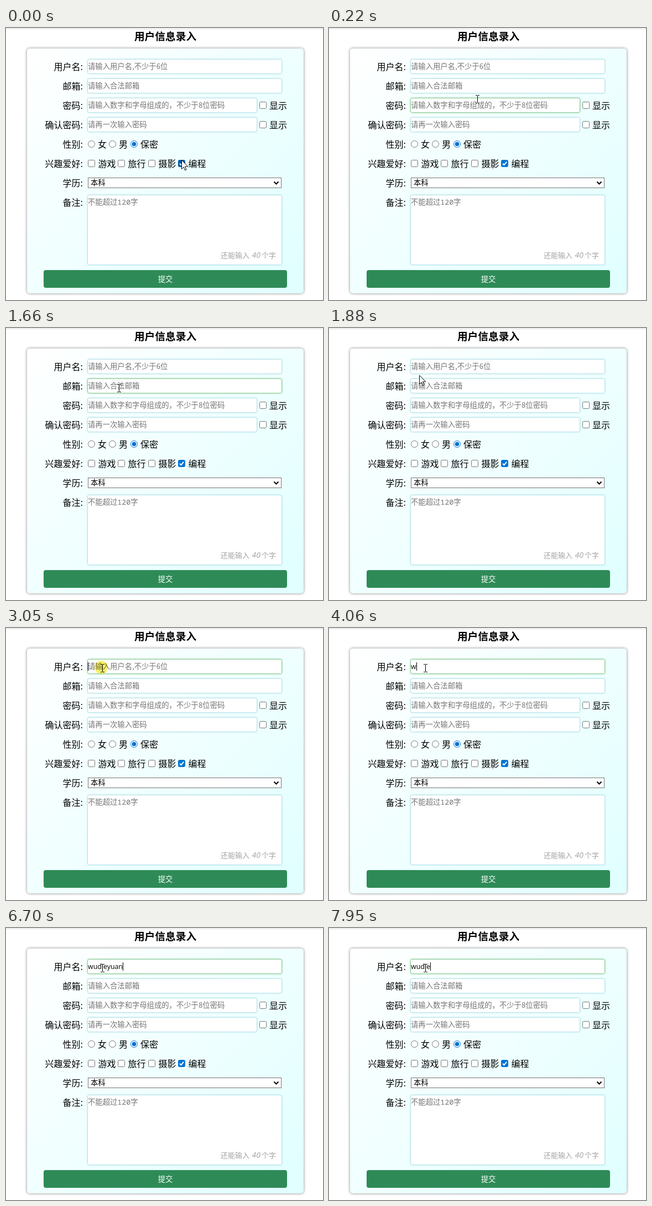
Recreate the animation shown at these times as an HTML page. Size 573x491 px, loop 8000 ms.

```html
<!DOCTYPE html>
<html lang="zh-CN">
<head>
<meta charset="utf-8">
<title>用户信息录入</title>
<style>
html, body { margin: 0; width: 100%; height: 100%; overflow: hidden; background: #fff; }
svg { display: block; }
text { font: 16px "Noto Sans CJK SC", "Noto Sans CJK", sans-serif; white-space: pre; }
.label { text-anchor: end; }
.small { font-size: 13.33px; }
.hint { font-size: 13.33px; fill: #757575; }
.mono { font-family: "Noto Sans Mono", "Noto Sans CJK SC", "Noto Sans CJK", monospace; }
.count { font-size: 13px; fill: #a4a4a4; }
.field { fill: #fff; stroke: #b9e3ea; filter: drop-shadow(0 0 1.2px #b0e0e6); }
.field.active { stroke: #8fca98; filter: drop-shadow(0 0 1.5px #8fd49b); }
.control { fill: #fff; stroke: #767676; }
#typed { font: 12.4px "Open Sans", sans-serif; }
#halo { mix-blend-mode: multiply; }
</style>
</head>
<body>
<svg width="573" height="491" viewBox="0 0 573 491">
  <defs>
    <linearGradient id="sky" gradientUnits="userSpaceOnUse" x1="52.5" y1="22.5" x2="523.5" y2="493.5">
      <stop stop-color="#fff"/><stop offset="1" stop-color="#e0ffff"/>
    </linearGradient>
  </defs>
  <path d="M0 1.5H573" stroke="#dcdcdc"/>
  <text x="288" y="22" text-anchor="middle" style="font-size:18.72px;font-weight:bold">用户信息录入</text>
  <rect x="38" y="37" width="500" height="442" rx="5" fill="url(#sky)" style="filter:drop-shadow(0 0 2.5px #808080)"/>

  <g id="form"></g>

  <rect class="control" x="148.5" y="270.5" width="349" height="18"/>
  <text class="small" x="153" y="284">本科</text>
  <path d="M484.5 277.5l4 4 4-4" fill="none" stroke="#000" stroke-width="2"/>

  <text class="count" x="388" y="415">还能输入</text>
  <text class="count" x="444.5" y="415" style="font:italic 14px 'Open Sans',sans-serif">40</text>
  <text class="count" x="462" y="415">个字</text>

  <rect x="68" y="437" width="440" height="32" rx="4" fill="#2e8b57"/>
  <text class="small" x="288" y="458" text-anchor="middle" fill="#fff">提交</text>

  <text id="typed" x="148" y="74"></text>
  <rect id="caret" y="62" width="1" height="15"/>

  <g id="tooltip">
    <rect x="268.5" y="142.5" width="99" height="24" fill="#fff" stroke="#575757"/>
    <text x="276" y="159" style="font-size:12px" fill="#333">请填写此字段。</text>
  </g>
  <circle id="halo" cx="172" cy="71" r="12" fill="#f8f16c"/>
  <path id="arrow" d="M.5.5V16.5L4.2 13 6.6 18.8 9 17.8 6.6 12H11.8Z" fill="#fff" stroke="#000"/>
  <path id="beam" d="M-3-6.5H0M1-6.5H4M.5-6V7M-3 7.5H0M1 7.5H4" fill="none" stroke="#000"/>
</svg>
<script>
const LOOP = 8000;
const $ = id => document.getElementById(id);

function add(tag, attrs, content = '') {
  const node = document.createElementNS('http://www.w3.org/2000/svg', tag);
  for (const key in attrs) node.setAttribute(key, attrs[key]);
  node.textContent = content;
  return $('form').appendChild(node);
}
const text = (x, y, content, cls = '') => add('text', {x, y, class: cls}, content);
const field = (y, width, height = 26) =>
  add('rect', {x: 147.5, y, width, height, rx: 3, class: 'field'});
const checkbox = (x, y) =>
  add('rect', {x: x - 6, y: y - 6, width: 12, height: 12, rx: 2, class: 'control'});

['用户名', '邮箱', '密码', '确认密码', '性别', '兴趣爱好', '学历', '备注']
  .forEach((name, row) => text(139, 76 + 35 * row, name + ':', 'label'));

const hints = ['请输入用户名,不少于6位', '请输入合法邮箱',
  '请输入数字和字母组成的，不少于8位密码', '请再一次输入密码'];
const fields = [], placeholders = [];
hints.forEach((hint, row) => {
  const y = 35 * row;
  fields.push(field(56.5 + y, row < 2 ? 351 : 306));
  placeholders.push(text(148, 74 + y, hint, 'hint'));
  if (row > 1) {
    checkbox(464.5, 69.5 + y);
    text(476, 76 + y, '显示');
  }
});

[[154.5, '女'], [192.5, '男'], [231.5, '保密']].forEach(([cx, name], i) => {
  const circle = add('circle', {cx, cy: 209.5, r: 6, class: 'control'});
  if (i === 2) {
    circle.style.stroke = '#0074d4';
    add('circle', {cx, cy: 209.5, r: 3.8, fill: '#0074d4'});
  }
  text(cx + 11.5, 216, name);
});

const boxes = [[154.5, '游戏'], [208.5, '旅行'], [263.5, '摄影'], [317.5, '编程']]
  .map(([x, name]) => (text(x + 12, 251, name), checkbox(x, 244.5)));
const checked = boxes[3];
add('path', {d: 'M314 244.7l2.5 2.6 4.7-5.6', fill: 'none', stroke: '#fff', 'stroke-width': 2});

field(301.5, 351, 126);
text(148, 319, '不能超过120字', 'hint mono');

// time, x, y, pointer shape, highlighted field
const pointer = [
  [0, 317, 238, 'arrow'],
  [70, 304, 192, 'arrow'],
  [145, 282, 146, 'beam', 2],
  [220, 268, 128, 'beam', 2],
  [1500, 251, 126, 'arrow', 2],
  [1580, 226, 117, 'beam', 1],
  [1650, 204, 108, 'beam', 1],
  [1730, 184, 99, 'beam', 1],
  [1800, 170, 92, 'beam', 1],
  [1880, 163, 85, 'arrow'],
  [2130, 168, 81, 'beam', 0],
  [2210, 169, 79, 'beam', 0],
  [2650, 172, 76, 'beam', 0],
  [2730, 174, 74, 'beam', 0],
  [2880, 174, 72, 'beam', 0]
];
const userName = 'wudieyuan';
// time, number of letters
const typing = [[0, 0], [4060, 1], [4360, 2], [4440, 3], [4980, 4], [5210, 5], [5360, 6],
  [5510, 7], [5600, 8], [5680, 9], [7310, 8], [7480, 7], [7780, 6], [7950, 5]];
const caretOn = [[3050, 3600], [4060, 6150], [6700, 7250], [7780, LOOP]];

const latest = (steps, t) => steps.findLast(step => step[0] <= t);
const within = (t, [from, to]) => t >= from && t < to;
const show = (node, on) => { node.style.display = on ? '' : 'none'; };

function draw(t) {
  const [, x, y, shape, active] = latest(pointer, t);
  for (const id of ['arrow', 'beam']) {
    show($(id), id === shape);
    $(id).setAttribute('transform', `translate(${x} ${y})`);
  }
  fields.forEach((node, i) => node.classList.toggle('active', i === active));

  const color = t < 70 ? '#005ba8' : '#0074d4';
  checked.style.fill = checked.style.stroke = color;

  show($('tooltip'), within(t, [750, 1580]));
  show($('halo'), within(t, [3050, 3200]));

  const count = latest(typing, t)[1];
  $('typed').textContent = userName.slice(0, count);
  show(placeholders[0], count === 0);
  const width = count ? $('typed').getComputedTextLength() : 0;
  $('caret').setAttribute('x', Math.round(148 + width));
  show($('caret'), caretOn.some(span => within(t, span)));
}

const start = performance.now();
function tick() {
  draw((performance.now() - start) % LOOP);
  requestAnimationFrame(tick);
}
tick();
</script>
</body>
</html>
```
